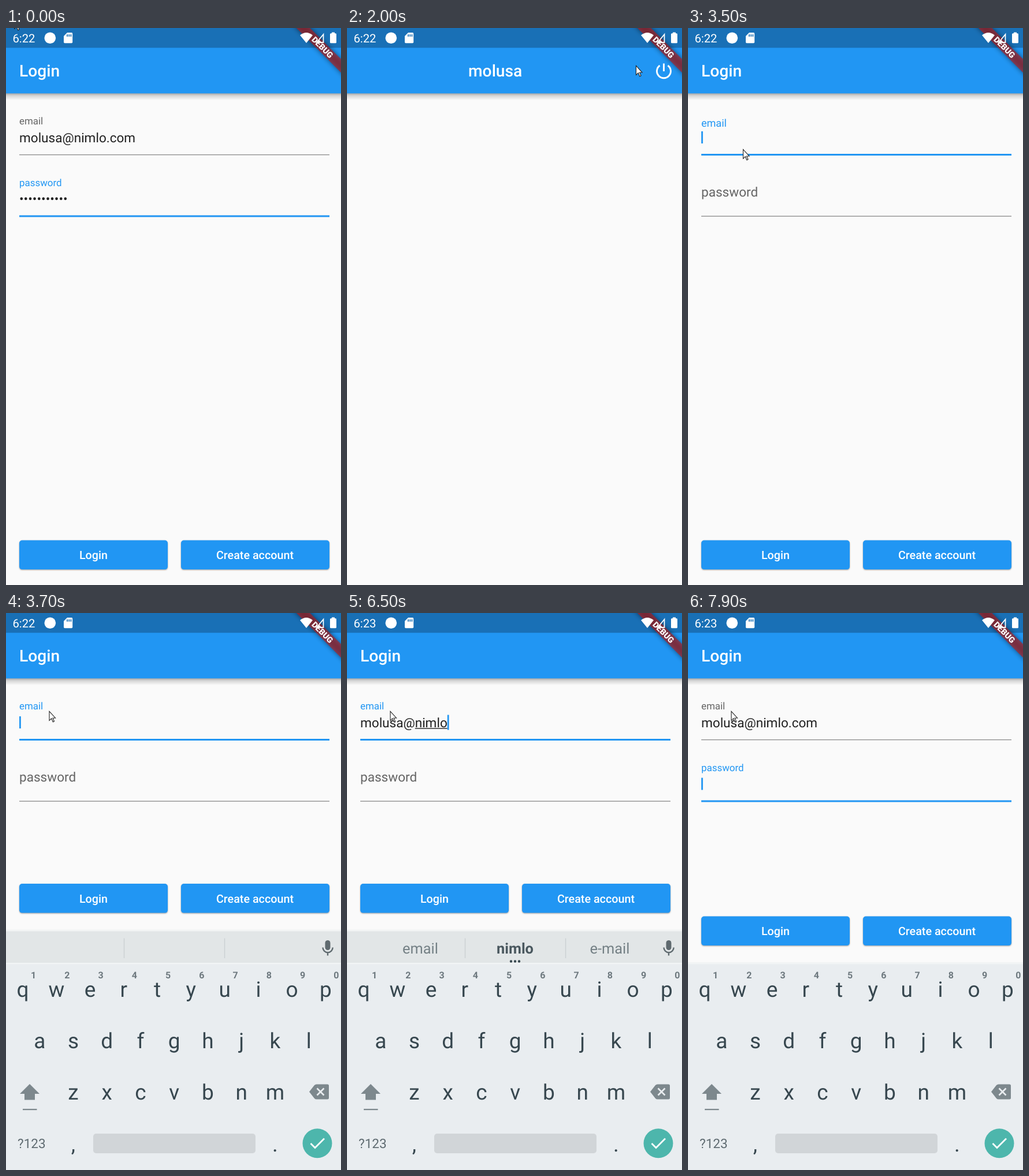
An HTML page that plays this animation: 580 by 965 pixels, repeating every 8 s.

```html
<!DOCTYPE html>
<html lang="en">
<head>
<meta charset="utf-8">
<title>Login</title>
<style>
  html, body { margin: 0; width: 100%; height: 100%; overflow: hidden; background: #fafafa; }
  svg { display: block; width: 100%; height: 100%; font-family: Roboto, sans-serif; text-rendering: geometricPrecision; }
  text { white-space: pre; }
  .mid { text-anchor: middle; }
  .title { font-size: 28.2px; font-weight: 500; fill: #fff; }
  .value { font-size: 22.56px; fill: #212121; }
  .button rect { fill: #2196f3; filter: drop-shadow(0 1.4px 1.3px rgba(0, 0, 0, .38)); }
  .button text { font-size: 19.74px; font-weight: 500; fill: #fff; text-anchor: middle; }
  .key { font-size: 37px; fill: #37474f; text-anchor: middle; }
  .hint { font-size: 16px; font-weight: 700; fill: #6d787e; text-anchor: middle; }
  .word { font-size: 25.35px; fill: #748085; text-anchor: middle; }
</style>
</head>
<body>
<svg viewBox="0 0 580 965">
  <defs>
    <linearGradient id="fade" x2="0" y2="1">
      <stop offset="0" stop-opacity=".34"/>
      <stop offset=".35" stop-opacity=".15"/>
      <stop offset="1" stop-opacity="0"/>
    </linearGradient>
    <clipPath id="loginShape"><rect x="23" y="887.5" width="257" height="50.6" rx="5"/></clipPath>
  </defs>
  <rect width="580" height="965" fill="#fafafa"/>
  <rect y="113" width="580" height="12" fill="url(#fade)"/>
  <rect width="580" height="113.3" fill="#2196f3"/>

  <g id="loginPage">
    <text class="title" x="23" y="84">Login</text>
    <g id="email"></g>
    <g id="password" transform="translate(0 106.5)"></g>
    <g id="buttons">
      <g class="button">
        <rect x="23" y="887.5" width="257" height="50.6" rx="5"/>
        <circle id="ripple" cx="162" cy="901" fill="#fff" opacity=".2" clip-path="url(#loginShape)"/>
        <text x="151.5" y="920">Login</text>
      </g>
      <g class="button">
        <rect x="303" y="887.5" width="257" height="50.6" rx="5"/>
        <text x="431" y="920">Create account</text>
      </g>
    </g>
  </g>

  <g id="homePage">
    <text class="title mid" x="256.7" y="84">molusa</text>
    <path d="M541.5 65A12 12 0 1 0 555.5 65M548.5 61.5V75" fill="none" stroke="#fff" stroke-width="2.9"/>
  </g>

  <g id="keyboard">
    <g id="strip">
      <rect y="548.5" width="580" height="4" fill="#f2f4f4"/>
      <rect y="551.5" width="580" height="57" fill="#e2e6e7"/>
      <path d="M204.5 563.5V598M378.5 563.5V598" stroke="#cbd0d2" stroke-width="1.4"/>
      <rect x="552.5" y="567" width="9" height="17" rx="4.5" fill="#5f6a6f"/>
      <path d="M548.5 579.5a8.6 8.6 0 0 0 17.2 0M557 588v5.5" fill="none" stroke="#5f6a6f" stroke-width="2.4"/>
      <g id="words"></g>
      <path id="dots" d="M284 603.5h0m7 0h0m7 0h0" stroke="#37474f" stroke-width="4.4" stroke-linecap="round"/>
    </g>
    <rect y="606" width="580" height="4" fill="#f1f4f5"/>
    <rect y="608.5" width="580" height="357" fill="#e9edf0"/>
    <g id="keys"></g>
    <path d="M41 816L58 833H50V843.5H32V833H24ZM29 859H53.5V861.3H29Z" fill="#7d888d"/>
    <path d="M525 829.5L534 818Q535.5 816.5 537.5 816.5H556.5Q559 816.5 559 819V840Q559 842.5 556.5 842.5H537.5Q535.5 842.5 534 841Z" fill="#7d888d"/>
    <path d="M538.5 823.5l12 12m0 -12l-12 12" stroke="#e9edf0" stroke-width="2.7"/>
    <text x="20" y="926.5" font-size="22.5" fill="#5f6b71">?123</text>
    <rect x="151" y="902" width="281" height="34" rx="5" fill="#d1d5d8"/>
    <circle cx="539" cy="918.7" r="25.5" fill="#4db6ac"/>
    <path d="M527.5 919l7.5 7.5l16 -16" fill="none" stroke="#fff" stroke-width="2.8"/>
  </g>

  <rect width="580" height="34.3" fill="#1970b6"/>
  <g transform="translate(580 0) rotate(45)">
    <rect x="-70" y="38" width="140" height="16.6" fill-opacity=".5" style="filter:blur(4.5px)"/>
    <rect x="-70" y="38" width="140" height="16.6" fill="#b71c1c" fill-opacity=".627"/>
    <text class="mid" x="1" y="51.4" font-size="14.2" font-weight="900" fill="#fff">DEBUG</text>
  </g>
  <g fill="#fff">
    <text id="clock" x="11.5" y="25" font-size="20.2"></text>
    <circle cx="76.3" cy="17.2" r="9.8"/>
    <path d="M106 8H113.5Q115.2 8 115.2 9.7V24.5Q115.2 26.2 113.5 26.2H101.7Q100 26.2 100 24.5V14Z"/>
    <path d="M106 11v4m3.2 -4v4m3.2 -4v4" stroke="#1970b6" stroke-width="1.7"/>
    <path d="M520 26L509 12.5Q520 3.5 531 12.5Z"/>
    <path d="M538 25L549.5 11V25Z" fill="none" stroke="#fff" stroke-width="1.8"/>
    <rect x="564" y="7.5" width="5" height="4"/>
    <rect x="561" y="9.3" width="11" height="16.9" rx="1.5"/>
  </g>
  <path id="mouse" d="M.5 .5V16.3L4.2 12.8L6.8 18.7L9 17.7L6.5 12H11Z" fill="#fff" stroke="#222" stroke-width="1.1"/>
</svg>
<script>
const LOOP = 8000, STEP = 100, LEFT = 23;
const ADDRESS = 'molusa@nimlo.com';
const LOGIN = 1200, LOGOUT = 2400, EMAIL_FOCUS = 3300, PASSWORD_FOCUS = 7600;

const $ = id => document.getElementById(id);
const show = (node, on) => node.setAttribute('visibility', on ? 'inherit' : 'hidden');
const shift = (node, x, y) => node.setAttribute('transform', `translate(${x} ${y})`);
const set = (node, attrs) => Object.entries(attrs).forEach(([name, value]) => node.setAttribute(name, value));
const ramp = (t, start, length) => Math.min(1, Math.max(0, (t - start) / length));
const smooth = u => u * u * (3 - 2 * u);
const burst = (start, gap, count) => Array.from({ length: count }, (_, i) => start + gap * i);

function add(parent, tag, attrs, text = '') {
  const node = document.createElementNS('http://www.w3.org/2000/svg', tag);
  set(node, attrs);
  node.textContent = text;
  return parent.appendChild(node);
}

// User name, @, domain, dot, ending.
const strokes = [...burst(4200, 100, 6), 5400, ...burst(5800, 175, 5), 7100, ...burst(7300, 100, 3)];
const caretWakes = [300, EMAIL_FOCUS, ...strokes, PASSWORD_FOCUS];

// Mouse moves: start, end, x, y.
const moves = [
  [0, 300, 234, 430], [300, 600, 161, 899], [1200, 1400, 161, 582], [1500, 2000, 500, 65],
  [2000, 2200, 534, 64], [2400, 3200, 95, 210], [3500, 3700, 74.5, 170]
];
const mouseAt = t => moves.reduce(([x, y], [start, end, toX, toY]) => {
  const u = smooth(ramp(t, start, end - start));
  return [x + (toX - x) * u, y + (toY - y) * u];
}, [14, -15]);

function makeField(name, focusTime, blurTime) {
  const root = $(name);
  return {
    focusTime, blurTime,
    label: add(root, 'text', { x: LEFT }, name),
    value: add(root, 'text', { x: LEFT, y: 197.5, class: 'value' }),
    rule: add(root, 'rect', { x: LEFT, width: 537 }),
    compose: add(root, 'rect', { y: 199.3, height: 1.4, fill: '#212121' }),
    caret: add(root, 'rect', { width: 2.8, fill: '#2196f3' })
  };
}

function drawField(field, t, text, composeStart, activeAtStart) {
  const { label, value, rule, compose, caret, focusTime, blurTime } = field;
  const active = t < LOGIN ? activeAtStart : t >= focusTime && t < blurTime;
  const raised = t < LOGIN ? 1 : ramp(t, focusTime - 120, 400) * (t >= focusTime);
  set(label, { y: 185.5 - 18.5 * raised, 'font-size': 22.56 - 5.64 * raised, fill: active ? '#2196f3' : '#646464' });
  set(rule, active ? { y: 218, height: 3, fill: '#2196f3' } : { y: 218.9, height: 1.4, fill: '#929292' });

  value.textContent = text.slice(0, composeStart);
  const start = value.getComputedTextLength();
  value.textContent = text;
  const width = value.getComputedTextLength();
  set(compose, { x: LEFT + start, width: Math.max(0, width - start) });
  set(caret, { x: LEFT + width, ...(text ? { y: 176.5, height: 26 } : { y: 179, height: 21 }) });
  show(caret, active && caretWakes.some(wake => t >= wake && t < wake + 500));
}

const email = makeField('email', EMAIL_FOCUS, PASSWORD_FOCUS);
const password = makeField('password', PASSWORD_FOCUS, LOOP);
const words = [127, 291, 455].map(x => add($('words'), 'text', { x, y: 590, class: 'word' }));
words[1].style.fill = '#4a585f';

const PITCH = 58.25;
const addKey = (c, x, y, kind = 'key') => add($('keys'), 'text', { x, y, class: kind }, c);
['qwertyuiop', 'asdfghjkl', 'zxcvbnm'].forEach((row, r) =>
  [...row].forEach((c, i) => addKey(c, PITCH * (i + (r || .5)), 665 + 89 * r)));
[...'1234567890'].forEach((c, i) => addKey(c, 47.5 + PITCH * i, 633, 'hint'));
addKey(',', PITCH * 2, 933);
addKey('.', PITCH * 8, 933);

function drawSuggestions(t, text) {
  const [user, domain] = text.split('@');
  const word = (domain ?? user).split('.')[0];
  const sides = domain === undefined ? ['mines', 'mounds'] : ['email', 'e-mail'];
  const visible = word && t < PASSWORD_FOCUS;
  const row = visible ? [sides[0], word, sides[1]] : ['', '', ''];
  words.forEach((node, i) => { node.textContent = row[i]; });
  words[1].style.fontWeight = domain ? 700 : 400;
  show($('dots'), visible);
}

function render(now) {
  const t = Math.floor(now % LOOP / STEP) * STEP;
  const home = t >= LOGIN && t < LOGOUT;
  const filled = t < LOGIN;
  const text = filled ? ADDRESS : ADDRESS.slice(0, strokes.filter(time => time <= t).length);
  const composeStart = text.includes('.') ? text.length : text.indexOf('@') + 1;

  drawField(email, t, text, composeStart, false);
  drawField(password, t, filled ? '•'.repeat(11) : '', 11, true);
  drawSuggestions(t, text);
  show($('homePage'), home);
  show($('loginPage'), !home);

  const down = 418.5 * (1 - ramp(t, 3500, 200)) ** 2;
  const collapsed = 56.5 * ramp(t, PASSWORD_FOCUS, 200);
  shift($('keyboard'), 0, down);
  shift($('strip'), 0, collapsed);
  shift($('buttons'), 0, down + collapsed - 418.5);

  const pressed = t >= 800 && t < 1000;
  $('ripple').setAttribute('r', pressed ? 45 + 170 * ramp(t, 800, 200) : 0);
  $('clock').textContent = t < 5600 ? '6:22' : '6:23';
  shift($('mouse'), ...mouseAt(t));
}

const began = performance.now();
function tick() {
  render(performance.now() - began);
  requestAnimationFrame(tick);
}
tick();
</script>
</body>
</html>
```
